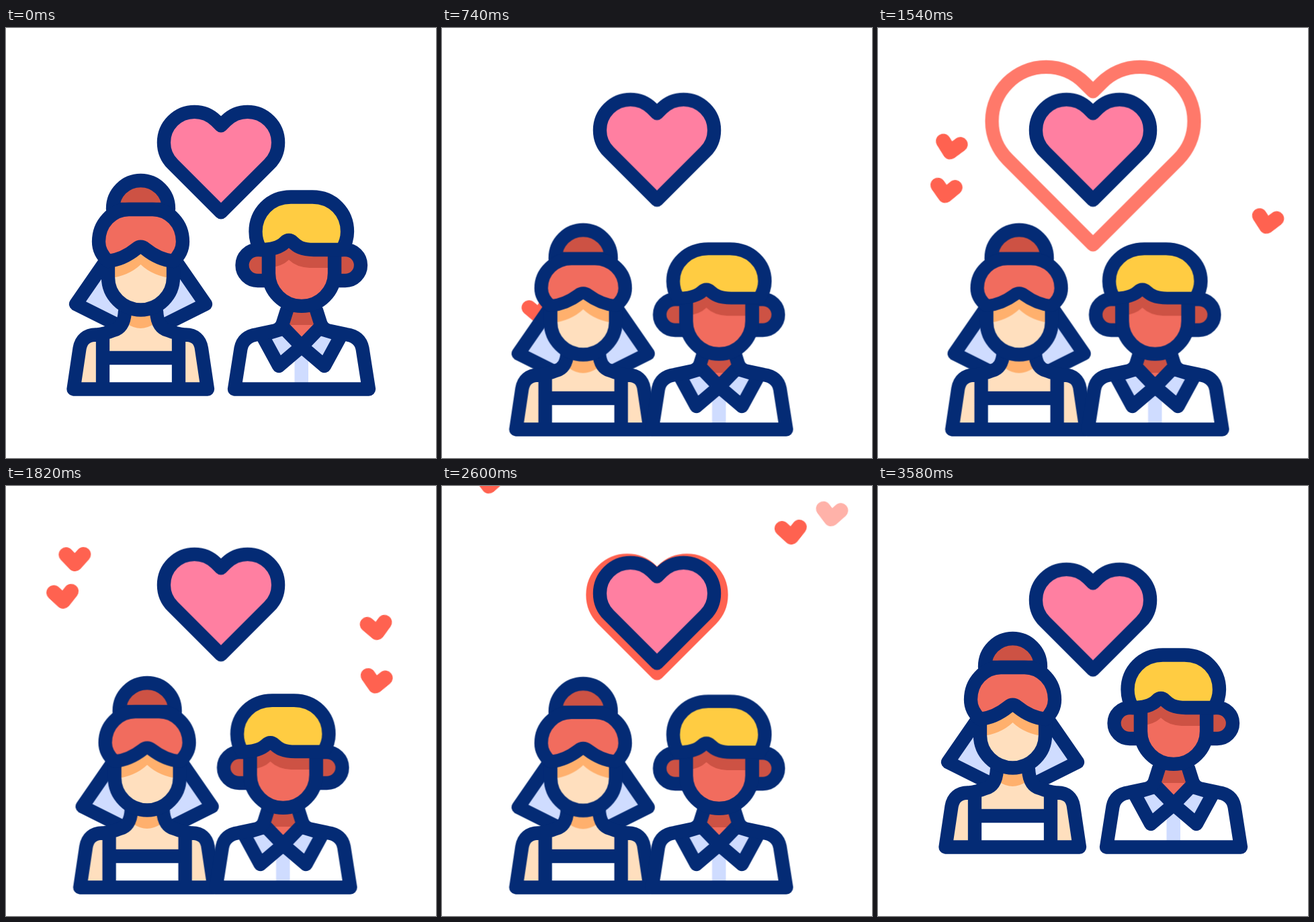
An HTML page for the animation above (3.6 s loop, 640 by 640 pixels).

```html
<!DOCTYPE html>
<html lang="en">
<head>
<meta charset="utf-8">
<title>Couple in love</title>
<style>
  html, body { margin: 0; width: 100%; height: 100%; overflow: hidden; background: #fff; }
  svg { display: block; width: 100%; height: 100%; }
  .line { stroke: #042b75; stroke-width: 20.3; stroke-linecap: round; stroke-linejoin: round; }
  .none { fill: none; }
  .white { fill: #fff; }
  .veil { fill: #cfdcff; }
  .skin { fill: #ffdfbe; }
  .shade { fill: #ffb06d; }
  .red { fill: #f16c5e; }
  .dark { fill: #cd5244; }
  .blond { fill: #ffcc42; }
  .pink { fill: #ff7fa1; }
  #pulse { fill: none; stroke: #ff6250; stroke-width: 20.3; stroke-linejoin: round; vector-effect: non-scaling-stroke; }
  #floaters path { fill: none; stroke: #ff6250; stroke-width: 22; stroke-linecap: round; stroke-linejoin: round; }
</style>
</head>
<body>
<svg viewBox="0 0 640 640">
  <g id="floaters"></g>
  <path id="pulse"/>
  <path id="love" class="line pink"/>

  <g id="woman">
    <path id="veil" class="line veil" d="M151 343L104 411L180 449H221L297 411L250 343Z"/>
    <path class="skin" d="M100.5 537.5L109.5 477Q113 457 134 456.5Q176 452 176 415H225Q225 452 267 456.5Q288 457 291 477L300 537.5Z"/>
    <path id="womanShade" class="shade" d="M176 410H225L221 440Q200 454 180 440Z"/>
    <path class="white" d="M144 491H257V537H144Z"/>
    <path class="line none" d="M177 422C176 438 171 447 160 450Q148 455 134 456.5Q113 457 109.5 477L100.5 537.5H300L291 477Q288 457 267 456.5Q253 455 241 450C230 447 225 438 224 422M144 460V537.5M257 460V537.5M144 491H257"/>
    <path id="bun" class="line dark" d="M159 270V268.5A41.5 41.5 0 0 1 242 268.5V270Z"/>
    <g id="face">
      <path class="skin" d="M152 335V371a48.5 48.5 0 0 0 97 0V335Z"/>
      <path class="shade" d="M152 335H249V373Q218 369 200.5 352Q183 369 152 373Z"/>
      <path class="line none" d="M152 345V371a48.5 48.5 0 0 0 97 0V345"/>
    </g>
    <path id="hair" class="line red" d="M152 347C142 338 138 328 138 318C138 291 158 270 183 270H218C243 270 263 291 263 318C263 328 259 338 249 347C229 345 215 335 207 328.5Q200.5 323 194 328.5C186 335 172 345 152 347Z"/>
  </g>

  <g id="man">
    <path class="white" d="M340 537.5L349.5 477Q353 457 374 456H506Q527 457 530.5 477L540 537.5Z"/>
    <path class="veil" d="M429.5 475H450V537H429.5Z"/>
    <path class="red" d="M417 410H463L470 447L440 474L410 447Z"/>
    <path id="manShade" class="dark" d="M417 400H463L466 442H414Z"/>
    <path class="line veil" d="M381 457L406 503L440 474L414 447ZM499 457L474 503L440 474L466 447Z"/>
    <path class="line none" d="M418 420L412 439Q409 448 400 450.5Q388 453 374 456Q353 459 349.5 477L340 537.5H540L530.5 477Q527 459 506 456Q492 453 480 450.5Q471 448 468 439L462 420"/>
    <path id="ears" class="line dark" d="M391 330H374.5a23 23 0 0 0 0 46H391ZM489 330H505a23 23 0 0 1 0 46H489Z"/>
    <g id="mug">
      <path class="red" d="M391 320V365a49 49 0 0 0 98 0V320Z"/>
      <path class="dark" d="M391 320H489V357H452Q432 356 421 345Q411 355 391 357Z"/>
      <path class="line none" d="M391 330V365a49 49 0 0 0 98 0V330"/>
    </g>
    <path id="crop" class="line blond" d="M379 330C374 322 371.5 312 371.5 303C371.5 275 393 251.5 424 251.5H456C487 251.5 508 275 508 303C508 312 505 322 500 330H458C440 330 433 325 427 319Q421 313 415 319C408 326 397 330 379 330Z"/>
  </g>
</svg>

<script>
const LOOP = 3600, BEAT = 1200;
const SMOOTH = 'cubic-bezier(.333, 0, .667, 1)', SOFT_STOP = 'cubic-bezier(.35, .35, .6, 1)';

const get = id => document.getElementById(id);
const shift = (x, y) => `translate(${x}px, ${y}px)`;

// rows: [time, value, easing]
function play(el, prop, duration, rows) {
  const frames = rows.map(([t, value, easing = SMOOTH]) =>
    ({ offset: t / duration, [prop]: value, easing }));
  el.animate(frames, { duration, iterations: Infinity });
}

// Walk together, stay, walk back
function walk(id, x, y) {
  const home = shift(0, 0), there = shift(x, y);
  play(get(id), 'transform', LOOP,
    [[0, home], [400, there], [2800, there], [3200, home], [LOOP, home]]);
}
walk('woman', 9.6, 60);
walk('man', -27.5, 60);

// Three nods while standing; squash scales height about pivot
function nod(id, drop, squash = 1, pivot = 0) {
  const pose = (y, k) => `${shift(0, pivot + y)} scale(1, ${k}) ${shift(0, -pivot)}`;
  const up = pose(0, 1), down = pose(drop, squash), rows = [[0, up]];
  for (let t = 400; t <= 2800; t += 400) rows.push([t, t % 800 ? up : down]);
  play(get(id), 'transform', LOOP, [...rows, [LOOP, up]]);
}
for (const id of ['veil', 'bun', 'ears']) nod(id, 14.5);
for (const id of ['face', 'womanShade']) nod(id, 7);
for (const id of ['mug', 'manShade']) nod(id, 12);
nod('hair', 7, .9, 346);
nod('crop', 12, .93, 340);

// Heart with 45-degree sides, drawn from its lobe radius
function heartPath(r, cx, cy) {
  const k = r * Math.SQRT1_2, left = 320 - cx, right = 320 + cx;
  return `M320 ${cy - 2 * k + cx}L${left + k} ${cy - k}A${r} ${r} 0 1 0 ${left - k} ${cy + k}` +
    `L320 ${cy + 2 * k + cx}L${right + k} ${cy + k}A${r} ${r} 0 1 0 ${right - k} ${cy - k}Z`;
}
for (const id of ['love', 'pulse']) get(id).setAttribute('d', heartPath(45.6, 39.5, 170.4));

play(get('love'), 'transform', BEAT,
  [[0, shift(0, 0), SOFT_STOP], [590, shift(0, -24.5), 'linear'], [BEAT, shift(0, 0)]]);

// Outline that grows and fades on every beat
const ring = (y, s) => `${shift(320, y)} scale(${s}) ${shift(-320, -199.8)}`;
const small = ring(195.8, 1), large = ring(187.2, 2.27);
play(get('pulse'), 'transform', BEAT, [[0, small], [130, small], [500, large], [BEAT, large]]);
play(get('pulse'), 'opacity', BEAT, [[0, 0], [130, 0], [130, 1], [290, 1], [500, 0], [BEAT, 0]]);

// Small hearts slip out from behind a person, then rise and sway.
// pass: time at height 200, peak: time at the right end of the sway
const drifts = [
  { start: 660, home: 150, mid: 85, sway: 28, period: 1200, peak: 1650, pass: 1457, speed: .27 },
  { start: 1040, home: 200, mid: 76, sway: 25, period: 1500, peak: 1530, pass: 1690, speed: .277 },
  { start: 800, home: 440, mid: 549, sway: 32, period: 970, peak: 1590, pass: 1865, speed: .255, fade: 2760 },
  { start: 1420, home: 440, mid: 549, sway: 32, period: 970, peak: 2055, pass: 2113, speed: .295 }
];
const clamp = x => Math.max(0, Math.min(1, x));
const smooth = x => x * x * (3 - 2 * x);
const wave = turns => Math.cos(2 * Math.PI * turns);

function drift(h, t) {
  const phase = (t - h.peak) / h.period, d = t - h.pass;
  const out = smooth(clamp((t - h.start) / 400));
  const x = h.home + (h.mid + h.sway * wave(phase) - h.home) * out;
  const y = 200 - h.speed * d + .000055 * d * d;
  return `${shift(x, y)} rotate(${11 * wave(phase + .12)}deg)`;
}

for (const h of drifts) {
  const el = document.createElementNS('http://www.w3.org/2000/svg', 'path');
  el.setAttribute('d', 'M-13 -7L0 7L13 -7');
  get('floaters').append(el);
  const poses = [], end = h.fade ?? 3400;
  for (let t = 0; t <= LOOP; t += 20) poses.push([t, drift(h, t), 'linear']);
  play(el, 'transform', LOOP, poses);
  play(el, 'opacity', LOOP,
    [[0, 0], [h.start, 0], [h.start, 1], [end - 320, 1, 'linear'], [end, 0], [LOOP, 0]]);
}
</script>
</body>
</html>
```
